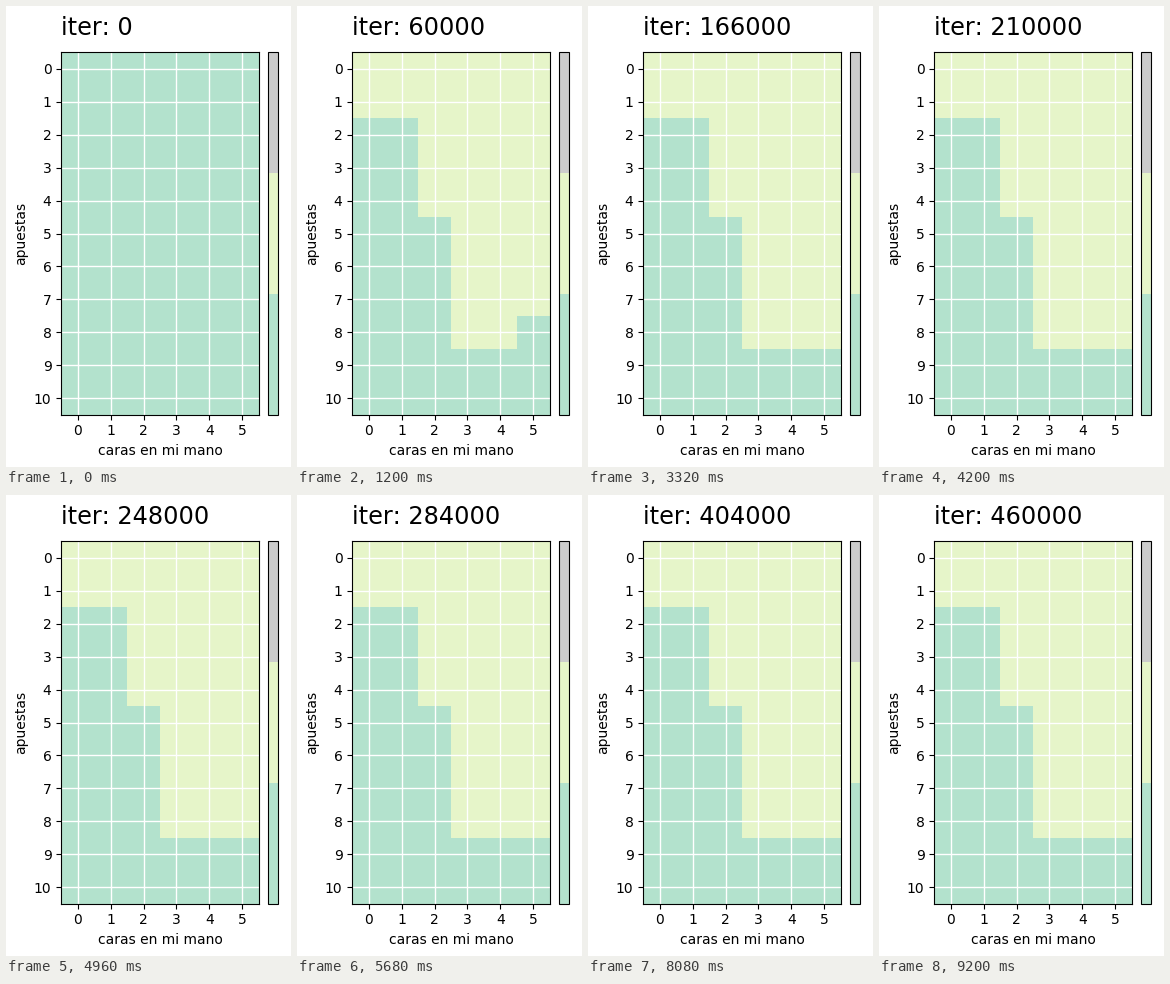
A matplotlib script that plays this animation: 285x461 px, repeating every 9.24 s.

```python
import numpy as np
import matplotlib.pyplot as plt
from matplotlib.animation import FuncAnimation
from matplotlib.colors import ListedColormap

W, H, DPI = 285, 461, 100
FRAMES, INTERVAL = 231, 40
STEP = 2000                      # iterations per frame
ROWS, COLS = 11, 6
LEFT, TOP, CELL = 55.23, 46.45, 32.925
BAR_LEFT, BAR_WIDTH = 261.9, 9.9
TITLE_LEFT, TITLE_BASE = 55.45, 29

GREEN, YELLOW, GRAY = "#b3e2cd", "#e6f5c9", "#cccccc"
PALETTE = ListedColormap([GREEN, YELLOW, GRAY])

# Number of yellow rows per column once settled, and the cells that turn late
LIMITS = np.array([2, 2, 5, 9, 9, 9])
LATE = {(7, 5): 5, (8, 3): 6, (8, 4): 12, (8, 5): 38}

plt.rcParams.update({"font.family": "DejaVu Sans", "font.size": 10,
                     "text.kerning_factor": 6})


def pixel_axes(fig, left, width):
    height = ROWS * CELL
    return fig.add_axes([left / W, 1 - (TOP + height) / H,
                         width / W, height / H])


def policy(frame):
    if frame == 0:
        return np.zeros((ROWS, COLS))
    grid = (np.arange(ROWS)[:, None] < LIMITS).astype(float)
    for cell, start in LATE.items():
        if frame < start:
            grid[cell] = 0
    return grid


# The tiny margin keeps the canvas from rounding down a pixel
fig = plt.figure(figsize=((W + 1e-6) / DPI, (H + 1e-6) / DPI), dpi=DPI,
                 facecolor="white")

ax = pixel_axes(fig, LEFT, COLS * CELL)
image = ax.imshow(policy(0), cmap=PALETTE, vmin=0, vmax=2,
                  interpolation="nearest", aspect="auto")
ax.set_xticks(range(COLS))
ax.set_yticks(range(ROWS))
ax.grid(color="white", linestyle="-", linewidth=1)
ax.set_xlabel("caras en mi mano")
ax.set_ylabel("apuestas")

fig.colorbar(image, cax=pixel_axes(fig, BAR_LEFT, BAR_WIDTH), ticks=[])

title = fig.text(TITLE_LEFT / W, 1 - TITLE_BASE / H, "iter: 0",
                 fontsize="xx-large", ha="left", va="baseline")


def update(frame):
    image.set_data(policy(frame))
    title.set_text(f"iter: {frame * STEP}")
    return image, title


anim = FuncAnimation(fig, update, frames=FRAMES, interval=INTERVAL,
                     repeat=True, repeat_delay=0, blit=False)
plt.show()
```
